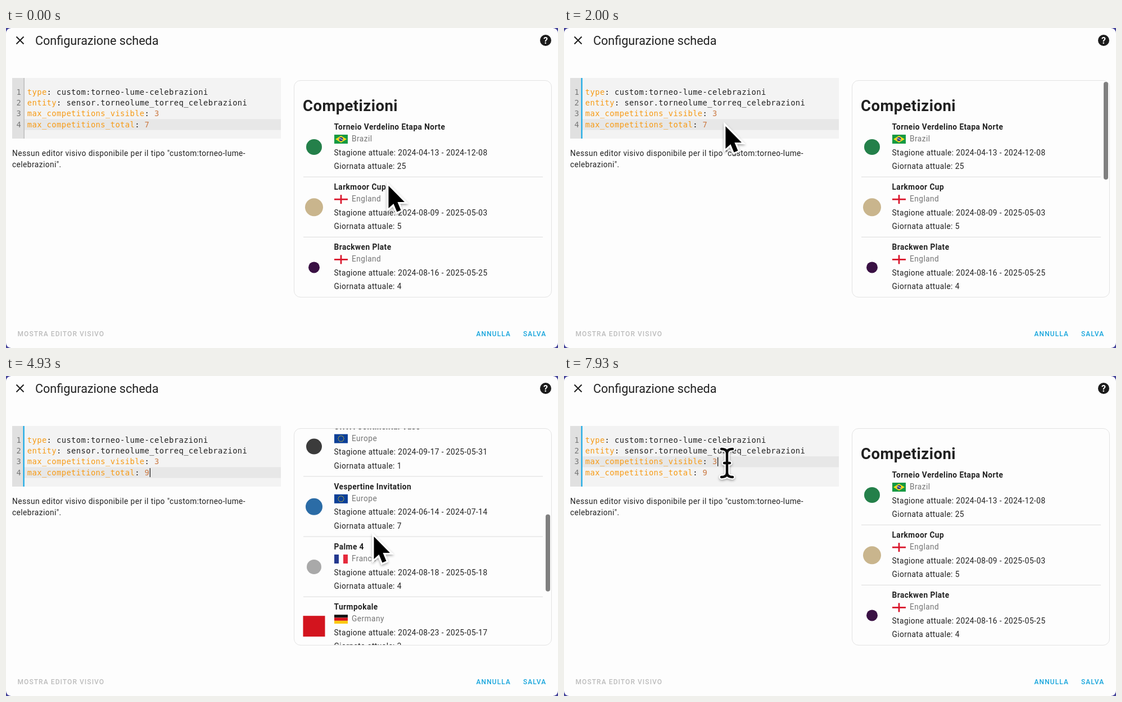
Animation of 982x570 px, one loop 8 s. Source, as an HTML page:

```html
<!DOCTYPE html>
<html lang="it">
<head>
<meta charset="utf-8">
<title>Configurazione scheda</title>
<style>
  html, body { margin: 0; width: 100%; height: 100%; overflow: hidden; background: #45439a; }
  svg { display: block; width: 100%; height: 100%; }
  text { font: 13.74px Roboto, sans-serif; letter-spacing: .43px; fill: #212121; white-space: pre; }
  .title { font-size: 21.58px; letter-spacing: 0; }
  .heading { font-size: 27.5px; font-weight: 700; }
  .name { font-weight: 700; }
  .country { fill: #757575; }
  .code { font-family: "DejaVu Sans Mono", monospace; }
  .key { fill: #f79a14; }
  .num { fill: #ca7841; }
  .gutter { fill: #767676; }
  .button { font-size: 12px; font-weight: 500; letter-spacing: 1.07px; fill: #16a5dc; }
  .disabled { fill: #bcbcbc; }
  .help { font-size: 16px; font-weight: 700; letter-spacing: 0; fill: #fff; text-anchor: middle; }
</style>
</head>
<body>
<svg id="stage" viewBox="0 0 982 570"></svg>
<script>
const LOOP = 8000, ROW = 107.2, VIEW = 385.5;
const MAX_SCROLL = { 7: 444.7, 9: 659 };

const rect = (x, y, w, h, fill, extra = '') =>
  `<rect x="${x}" y="${y}" width="${w}" height="${h}" fill="${fill}" ${extra}/>`;
const circle = (x, y, r, fill) => `<circle cx="${x}" cy="${y}" r="${r}" fill="${fill}"/>`;
const text = (x, y, content, cls = '') => `<text x="${x}" y="${y}" class="${cls}">${content}</text>`;

// Flags are 24 x 16
const vertical = colors => colors.map((c, i) => rect(i * 8, 0, 8, 16, c)).join('');
const horizontal = colors => colors.map((c, i) => rect(0, i * 16 / 3, 24, 16 / 3, c)).join('');
const flags = {
  Brazil: rect(0, 0, 24, 16, '#159a43') + '<path d="M12 2 22 8 12 14 2 8Z" fill="#fbdc1c"/>' +
    circle(12, 8, 3.6, '#243a80') + '<path d="M8.8 7Q12 6.6 15 9.4" stroke="#fff" fill="none"/>',
  England: rect(0, 0, 24, 16, '#fff') + rect(0, 6.6, 24, 2.8, '#d9182d') + rect(10.6, 0, 2.8, 16, '#d9182d'),
  Europe: rect(0, 0, 24, 16, '#0b3f98') + Array.from({ length: 12 }, (_, i) =>
    circle(12 + 5 * Math.sin(i * Math.PI / 6), 8 + 5 * Math.cos(i * Math.PI / 6), .75, '#f5d51d')).join(''),
  France: vertical(['#24388f', '#fff', '#e52a3c']),
  Germany: horizontal(['#111', '#d8141c', '#fbc911']),
  Italy: vertical(['#1a9449', '#fff', '#d0303b']),
  Netherlands: horizontal(['#b02333', '#fff', '#24488f']),
};

// name, country, season start, season end, match day, badge colour, badge radius
const competitions = [
  ['Torneio Verdelino Etapa Norte', 'Brazil', '2024-04-13', '2024-12-08', 25, '#24804a', 14],
  ['Larkmoor Cup', 'England', '2024-08-09', '2025-05-03', 5, '#c9b58d', 16],
  ['Brackwen Plate', 'England', '2024-08-16', '2025-05-25', 4, '#3a1144', 10],
  ['ORVA Continental Vase', 'Europe', '2024-09-17', '2025-05-31', 1, '#3b3b3b', 14],
  ['Vespertine Invitation', 'Europe', '2024-06-14', '2024-07-14', 7, '#2b6ca6', 15],
  ['Palme 4', 'France', '2024-08-18', '2025-05-18', 4, '#a9a9a9', 13],
  ['Turmpokale', 'Germany', '2024-08-23', '2025-05-17', 3, '#d3141e', 0],
  ['Torre Q', 'Italy', '2024-08-18', '2025-05-25', 4, '#cf4038', 10],
  ['Waterkrans', 'Netherlands', '2024-08-09', '2025-05-18', 5, '#143a70', 11],
];

function competition([name, country, start, end, day, color, radius], i) {
  const badge = radius ? circle(548, 212, radius, color) : rect(528.5, 192, 39, 37, color);
  const divider = i ? rect(529, 157.5, 426, 1, '#dcdcdc') : '';
  return `<g id="row${i}" transform="translate(0 ${i * ROW})">${divider}${badge}
    ${text(583.5, 181, name, 'name')}
    <g transform="translate(584 190)">${flags[country]}</g>
    ${text(615, 202, country, 'country')}
    ${text(583.5, 226.5, `Stagione attuale: ${start} - ${end}`)}
    ${text(583.5, 251, `Giornata attuale: ${day}`)}</g>`;
}

const codeLines = [
  ['type', 'custom:torneo-lume-celebrazioni'],
  ['entity', 'sensor.torneolume_torreq_celebrazioni'],
  ['max_competitions_visible', '<tspan class="num">3</tspan>'],
  ['max_competitions_total', '<tspan class="num" id="total">7</tspan>'],
];
const lineY = i => 118.8 + i * 19.3;
const code = codeLines.map(([key, value], i) =>
  text(18.5, lineY(i), i + 1, 'code gutter') +
  text(37.8, lineY(i), `<tspan class="key">${key}</tspan>: ${value}`, 'code')).join('');

const arrow = 'M0 0V40L9 32 15 46.5 22 43.5 16 29H28.5Z';
const beam = 'M-10-25Q0-25 0-17V17Q0 25-10 25M10-25Q0-25 0-17M0 17Q0 25 10 25M-5 0H5';

document.getElementById('stage').innerHTML = `
  <defs>
    <clipPath id="card"><rect x="513" y="94" width="457.5" height="385" rx="11"/></clipPath>
    <filter id="shadow" x="-50%" y="-50%" width="200%" height="200%">
      <feDropShadow dx="0" dy="2" stdDeviation="2" flood-opacity=".35"/></filter>
  </defs>
  ${rect(0, 0, 982, 570, '#fdfdfd', 'rx="9"')}
  <path d="M18.5 15.5 31.5 28.5M31.5 15.5 18.5 28.5" stroke="#212121" stroke-width="2.1"/>
  ${text(52, 29.5, 'Configurazione scheda', 'title')}
  ${circle(960, 22, 10, '#1c1c1c')}${text(960, 27.7, '?', 'help')}

  ${rect(11, 89, 478, 108, '#f3f3f3')}
  ${rect(11, 89, 21, 108, '#e0e0e0')}
  ${rect(32, 0, 457, 19.3, '#e7e7e7', 'id="active"')}
  <rect id="edge" y="89" height="108"/>
  ${code}
  <rect id="caret" width="1.3" height="16" fill="#222"/>
  ${text(11, 228, 'Nessun editor visivo disponibile per il tipo "custom:torneo-lume-')}
  ${text(11, 248, 'celebrazioni".')}

  <g clip-path="url(#card)"><g id="list">
    ${text(528, 148, 'Competizioni', 'heading')}
    ${competitions.map(competition).join('')}
  </g></g>
  ${rect(512.5, 93.5, 458, 386, 'none', 'rx="11.5" stroke="#e3e3e3"')}
  <rect id="thumb" x="960" width="8" rx="4" fill="#808080"/>

  ${text(20.5, 549, 'MOSTRA EDITOR VISIVO', 'button disabled')}
  ${text(836.5, 549, 'ANNULLA', 'button')}
  ${text(920, 549, 'SALVA', 'button')}

  <g id="pointer" filter="url(#shadow)">
    <path id="arrow" d="${arrow}" transform="translate(1.5 4)" stroke="#fff" stroke-width="6"
      paint-order="stroke"/>
    <g id="beam" fill="none" stroke-linecap="round">
      <path d="${beam}" stroke="#fff" stroke-width="8.5"/><path d="${beam}" stroke="#111" stroke-width="4.5"/></g>
  </g>`;

const $ = id => document.getElementById(id);
const set = (id, attrs) => { for (const k in attrs) $(id).setAttribute(k, attrs[k]); };
const show = (id, visible) => set(id, { visibility: visible ? 'visible' : 'hidden' });

// Smooth interpolation through [time, ...values] keys
function track(keys, t) {
  const next = keys.findIndex(k => k[0] > t);
  if (next === 0) return keys[0].slice(1);
  if (next < 0) return keys.at(-1).slice(1);
  const [t0, ...from] = keys[next - 1], [t1, ...to] = keys[next];
  const p = (t - t0) / (t1 - t0), eased = p * p * (3 - 2 * p);
  return from.map((v, i) => v + (to[i] - v) * eased);
}

const scrollKeys = [[70, 0], [700, MAX_SCROLL[7]], [1000, MAX_SCROLL[7]], [1600, 0],
  [4500, 0], [5243, MAX_SCROLL[9]], [5950, MAX_SCROLL[9]], [6600, 0]];
const thumbKeys = [[70, 0], [140, 1], [2100, 1], [2350, 0], [4480, 0], [4560, 1], [6950, 1], [7200, 0]];
const pointerKeys = [[100, 679, 277], [700, 717, 314], [1500, 717, 314], [1950, 286, 171], [2400, 283, 168],
  [3850, 283, 168], [4450, 653, 282], [6600, 653, 282], [7400, 290, 155]];
const DELETE_AT = 2550, TYPE_AT = 2900, BEAM_AT = 7350, CLICK_AT = 7600;

function render(t) {
  const focused = t >= 70, clicked = t >= CLICK_AT;
  const erased = t >= DELETE_AT && t < TYPE_AT;
  const count = t < TYPE_AT ? 7 : 9;
  const line = clicked ? 2 : 3;

  $('total').textContent = erased ? '' : count;
  set('active', { y: lineY(line) - 14.3 });
  set('edge', focused ? { x: 30.5, width: 2.2, fill: '#12a8e6' } : { x: 31.5, width: 1.3, fill: '#b5b5b5' });
  set('caret', { x: clicked ? 273 : erased ? 247 : 255.7, y: lineY(line) - 12.6 });
  show('caret', focused && (clicked || (t + 1100) % 1200 < 600));

  const [scroll] = track(scrollKeys, t);
  const content = VIEW + MAX_SCROLL[count];
  set('list', { transform: `translate(0 ${-scroll})` });
  set('thumb', {
    y: 96 + scroll / content * VIEW,
    height: VIEW / content * VIEW - 5,
    opacity: track(thumbKeys, t)[0],
  });
  for (const i of [7, 8]) show('row' + i, i < count);

  set('pointer', { transform: `translate(${track(pointerKeys, t)})` });
  show('arrow', t < BEAM_AT);
  show('beam', t >= BEAM_AT);
}

const started = performance.now();
function tick() {
  render((performance.now() - started) % LOOP);
  requestAnimationFrame(tick);
}
tick();
</script>
</body>
</html>
```
